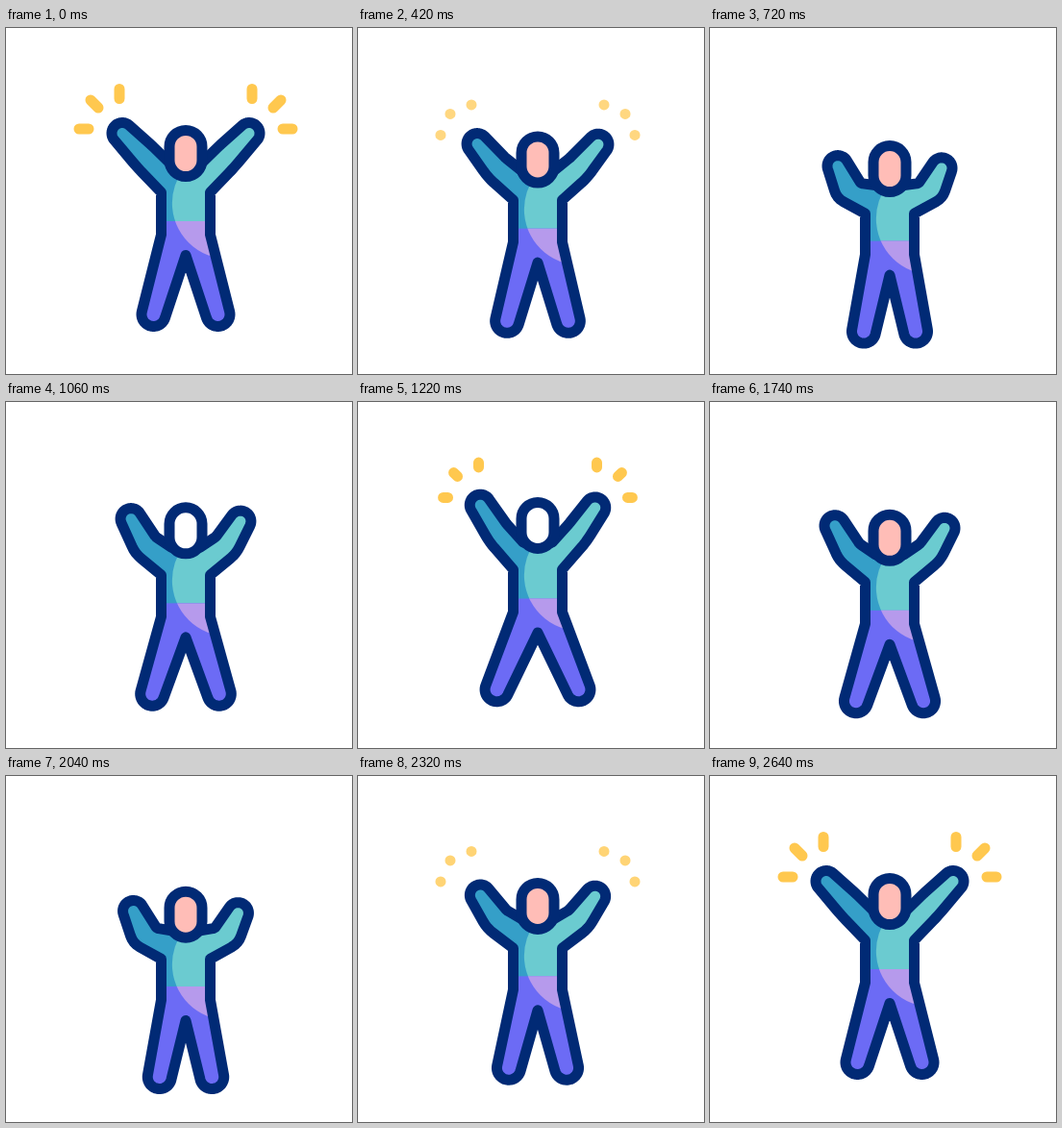
Write an HTML page that moves like this. It is 360 px wide and 360 px high and loops after 3 s.

```html
<!DOCTYPE html>
<html lang="en">
<head>
<meta charset="utf-8">
<title>Jumping figure</title>
<style>
html, body { margin: 0; width: 100%; height: 100%; overflow: hidden; background: #fff; }
svg { display: block; width: 100vw; height: 100vh; }
</style>
</head>
<body>
<svg viewBox="0 0 360 360">
  <defs>
    <clipPath id="clip"><path id="clipShape"/></clipPath>
    <clipPath id="belowWaist"><rect class="waist" x="80" y="201" width="214" height="150"/></clipPath>
    <path id="light" d="M182 40L180 154L175.8 164A58 58 0 0 0 215 238H310V40Z"/>
  </defs>
  <g id="sparks" fill="none" stroke="#ffc84f" stroke-width="11" stroke-linecap="round">
    <path id="sparkPath"/>
  </g>
  <g id="figure">
    <g clip-path="url(#clip)">
      <rect x="80" y="60" width="214" height="280" fill="#359fc8"/>
      <use href="#light" fill="#6bcbd0"/>
      <rect class="waist" x="80" y="201" width="214" height="150" fill="#6c6bf5"/>
      <g clip-path="url(#belowWaist)"><use href="#light" fill="#b69aec"/></g>
    </g>
    <path id="outline" fill="none" stroke="#012a75" stroke-width="11" stroke-linejoin="round"/>
    <rect id="head" x="170" y="106.5" width="34" height="48" rx="17" fill="#ffbdb7" stroke="#012a75" stroke-width="11"/>
  </g>
</svg>
<script>
const el = id => document.getElementById(id);
const waists = document.querySelectorAll('.waist');
const LOOP = 3000, CENTER = 187;

// lift: vertical shift of the whole body; stretch: extra torso length
const REST = {
  lift: 0, stretch: 0, hand: [121, 109.5], elbowUp: [152, 122.5], elbowLow: [136.5, 145],
  neck: [172, 142], armpit: [161.5, 171], foot: [153.5, 298]
};
const CROUCH = {
  lift: 16.5, stretch: 4.5, hand: [133, 127.5], elbowUp: [157, 145.5], elbowLow: [132, 161],
  neck: [172, 147.5], armpit: [161.5, 177], foot: [160, 299.5]
};
const JUMP = {
  lift: -5, stretch: 6, hand: [125, 102], elbowUp: [153.5, 122], elbowLow: [138.5, 142.5],
  neck: [172, 148.5], armpit: [161.5, 176], foot: [138.5, 302]
};
const MOVES = [
  { start: 220, end: 690, from: REST, to: CROUCH },
  { start: 690, end: 1430, from: CROUCH, to: JUMP },
  { start: 1430, end: 1900, from: JUMP, to: CROUCH },
  { start: 1900, end: 2640, from: CROUCH, to: REST }
];
// inner end and direction of each spark
const SPARKS = [[86, 105, -10, 0], [96, 83, -8, -8], [118, 73.5, 0, -10]];

const clamp = x => Math.min(1, Math.max(0, x));
const smooth = x => x * x * (3 - 2 * x);
const ramp = (x, a, b) => smooth(clamp((x - a) / (b - a)));
const mix = (a, b, k) => Array.isArray(a) ? a.map((v, i) => mix(v, b[i], k)) : a + (b - a) * k;

// round end of a limb, tangent to the lines towards points p and q
function cap(c, r, p, q) {
  const aim = (e, side) => {
    const dx = e[0] - c[0], dy = e[1] - c[1];
    return Math.atan2(dy, dx) + side * Math.acos(r / Math.hypot(dx, dy));
  };
  const a = aim(p, -1);
  let b = aim(q, 1);
  while (b >= a) b -= 2 * Math.PI;
  return Array.from({ length: 25 }, (_, i) => {
    const t = mix(a, b, i / 24);
    return [c[0] + r * Math.cos(t), c[1] + r * Math.sin(t)];
  });
}

function bend(a, p, b, size) {
  const toward = q => mix(p, q, size / Math.hypot(q[0] - p[0], q[1] - p[1]));
  const s = toward(a), e = toward(b);
  return [0, .25, .5, .75, 1].map(t => mix(mix(s, p, t), mix(p, e, t), t));
}

function side(pose, handDrop) {
  const hand = [pose.hand[0], pose.hand[1] + handDrop];
  const arm = cap(hand, 11, pose.elbowUp, pose.elbowLow);
  const hip = [161.5, 215 + pose.stretch];
  const crotch = [CENTER, 236.5 + pose.stretch];
  return [
    pose.neck,
    ...bend(pose.neck, pose.elbowUp, arm[0], 2),
    ...arm,
    ...bend(arm[24], pose.elbowLow, pose.armpit, 8),
    pose.armpit, hip,
    ...cap(pose.foot, 12.5, hip, crotch),
    crotch
  ];
}

function poseAt(t) {
  const move = MOVES.find(m => t >= m.start && t < m.end);
  if (!move) return { ...REST, glow: 1, grow: 1, atJump: false };
  const { from, to, start, end } = move;
  const u = (t - start) / (end - start);
  const rising = to !== CROUCH;
  const shape = smooth(u ** 1.3);
  const pose = {};
  for (const key in from) pose[key] = mix(from[key], to[key], shape);
  pose.lift = mix(from.lift, to.lift, smooth(rising ? u ** .8 : u));
  pose.grow = rising ? ramp(u, .56, .88) : 1 - ramp(u, 0, .45);
  pose.glow = rising ? clamp((u - .51) / .075) : 1 - clamp((u - .4) / .1);
  pose.atJump = from === JUMP || to === JUMP;
  return pose;
}

function draw(t) {
  const pose = poseAt(t);
  const left = side(pose, 0);
  const right = side(pose, pose.stretch / 2).map(([x, y]) => [2 * CENTER - x, y]).reverse();
  const d = 'M' + [...left, ...right].map(p => p.map(v => v.toFixed(2)).join(' ')).join('L') + 'Z';
  el('outline').setAttribute('d', d);
  el('clipShape').setAttribute('d', d);
  el('figure').setAttribute('transform', `translate(0 ${pose.lift})`);
  waists.forEach(w => w.setAttribute('y', 201 + pose.stretch));
  el('head').setAttribute('fill', t >= 900 && t < 1580 ? '#fff' : '#ffbdb7');

  const [ox, oy] = pose.atJump ? [7.5, -3.5] : [0, 0];
  let lines = '';
  for (const [x, y, dx, dy] of SPARKS) {
    const g = Math.max(pose.grow, .001);
    const px = x + ox, py = y + oy + pose.lift;
    lines += `M${px} ${py}l${dx * g} ${dy * g}M${2 * CENTER - px} ${py}l${-dx * g} ${dy * g}`;
  }
  el('sparkPath').setAttribute('d', lines);
  el('sparks').setAttribute('opacity', pose.glow);
}

const begin = performance.now();
function tick() {
  draw((performance.now() - begin) % LOOP);
  requestAnimationFrame(tick);
}
tick();
</script>
</body>
</html>
```
